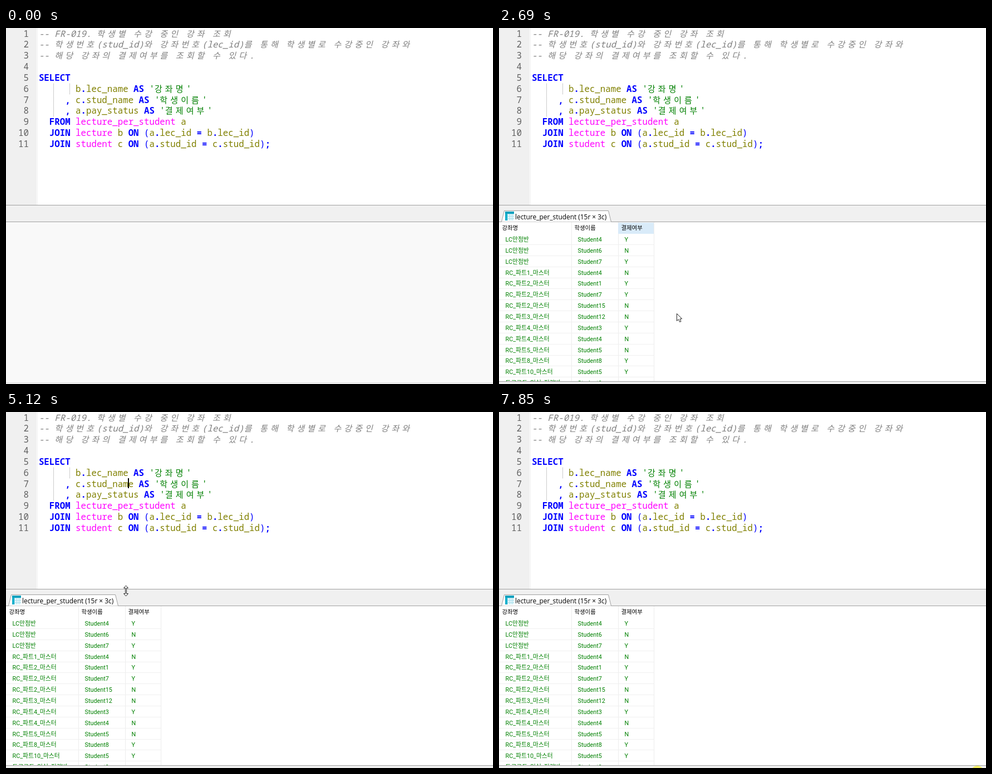
An HTML page with a canvas that plays this animation: 875 px wide and 640 px high, repeating every 7920 ms.

```html
<!DOCTYPE html>
<html lang="ko">
<head>
<meta charset="utf-8">
<style>
  html, body { margin: 0; width: 100%; height: 100%; overflow: hidden; background: #fff; }
  canvas { display: block; }
</style>
</head>
<body>
<canvas id="stage" width="875" height="640"></canvas>
<script>
const ctx = document.getElementById('stage').getContext('2d');
const LOOP = 7920, LINE = 19.85, CELL = 9.455, CODE_X = 58.9, RESULT_AT = 2020;
const MONO = '15.76px "Noto Sans Mono", "DejaVu Sans Mono", monospace';
const HANGUL = '15px "Noto Sans CJK KR", "Noto Sans CJK", sans-serif';
const GRID_FONT = 'Roboto, "Noto Sans CJK KR", "Noto Sans CJK", sans-serif';

const code = [
  '-- FR-019. 학생별 수강 중인 강좌 조회',
  '-- 학생번호(stud_id)와 강좌번호(lec_id)를 통해 학생별로 수강중인 강좌와',
  '-- 해당 강좌의 결제여부를 조회할 수 있다.',
  '',
  'SELECT',
  "       b.lec_name AS '강좌명'",
  "     , c.stud_name AS '학생이름'",
  "     , a.pay_status AS '결제여부'",
  '  FROM lecture_per_student a',
  '  JOIN lecture b ON (a.lec_id = b.lec_id)',
  '  JOIN student c ON (a.stud_id = c.stud_id);'
];
const TOKEN = /'[^']*'|\w+|[^\w\s]/g;

const part = n => `RC_파트${n}_마스터`;
const rows = [
  ['LC만점반', 4, 'Y'], ['LC만점반', 6, 'N'], ['LC만점반', 7, 'Y'],
  [part(1), 4, 'N'], [part(2), 1, 'Y'], [part(2), 7, 'Y'], [part(2), 15, 'N'],
  [part(3), 12, 'N'], [part(4), 3, 'Y'], [part(4), 4, 'N'], [part(5), 5, 'N'],
  [part(8), 8, 'Y'], [part(10), 5, 'Y'], ['토르코트_입실_전략반', 9, '']
];
const columns = [[0, 130, '강좌명'], [130, 214, '학생이름'], [214, 278, '결제여부']];

// Pointer paths: each is a run of [time, x, y]; the pointer is hidden between runs.
const paths = [
  [[190, 806, 603], [259, 806, 603], [260, 529, 255], [330, 529, 255]],
  [[530, 228, 2], [800, 210, 55], [1150, 221, 123], [1480, 221, 123], [1610, 260, 180],
   [2020, 260, 180], [2290, 245, 358], [2550, 245, 358], [2690, 320, 512],
   [2830, 230, 605], [2980, 80, 610], [3120, 12, 500], [3260, 35, 370], [3380, 140, 326],
   [3510, 270, 380], [3640, 284, 510], [3780, 190, 608], [3930, 50, 590], [4060, 8, 470],
   [4180, 35, 360], [4250, 70, 323.5], [4350, 210, 330], [4480, 340, 410], [4600, 355, 530],
   [4710, 250, 620], [4830, 80, 600], [4920, 15, 480], [5030, 60, 360], [5120, 214, 321.5],
   [5260, 320, 365], [5420, 352, 470], [5660, 352, 579], [6130, 352, 579],
   [6550, 340, 562], [7080, 352, 579], [7290, 783, 597], [7360, 783, 597]]
];
const caretOn = [[1100, 1550], [2700, 3240], [3780, 4320], [4870, 5400], [5930, 6480], [7080, 7630]];
const hovers = [[2200, 2760, 2], [3220, 3320, 0], [3450, 3530, 2], [4120, 4320, 0],
                [4380, 4450, 2], [5000, 5060, 0], [5220, 5300, 2]];
const during = t => ([from, to]) => t >= from && t < to;

function box(color, x, y, w, h) {
  ctx.fillStyle = color;
  ctx.fillRect(x, y, w, h);
}

function text(value, x, y, font, color, align = 'left') {
  ctx.font = font;
  ctx.fillStyle = color;
  ctx.textAlign = align;
  ctx.fillText(value, x, y);
}

function shape(points, fill, stroke, close = true) {
  ctx.beginPath();
  points.forEach(([x, y]) => ctx.lineTo(x, y));
  if (close) ctx.closePath();
  ctx.fillStyle = fill;
  ctx.strokeStyle = stroke;
  ctx.lineWidth = 1;
  ctx.fill();
  ctx.stroke();
}

// Hangul takes two cells of the character grid.
function cells(value, column, y, style, color) {
  for (const ch of value) {
    const wide = /[가-힣]/.test(ch);
    text(ch, CODE_X + column * CELL, y, style + (wide ? HANGUL : MONO), color);
    column += wide ? 2 : 1;
  }
}

function tokenStyle(token) {
  if (/^(SELECT|AS|FROM|JOIN|ON)$/.test(token)) return ['bold ', '#0000ff'];
  if (/^(lecture_per_student|lecture|student)$/.test(token)) return ['', '#ff00ff'];
  if (token[0] === "'") return ['', '#008000'];
  if (/\w/.test(token)) return ['', '#808000'];
  return [/[()]/.test(token) ? '' : 'bold ', '#0000ff'];
}

function drawEditor() {
  box('#fff', 0, 0, 875, 318);
  box('#f0f0f0', 0, 0, 55, 318);
  box('#f0f0f0', 56, 0, 1, 318);
  for (let y = 100; y < 160; y += 2) {
    box('#999', 85, y, 1, 1);
    if (y < 120) box('#999', 114, y, 1, 1);
  }
  code.forEach((line, i) => {
    const y = 15.5 + i * LINE;
    text(i + 1, 41, y, MONO, '#606060', 'right');
    if (line.startsWith('--')) return cells(line, 0, y, 'italic ', '#808080');
    for (const match of line.matchAll(TOKEN)) {
      cells(match[0], match.index, y, ...tokenStyle(match[0]));
    }
  });
}

function drawTab() {
  shape([[4.5, 348.5], [9.5, 328.5], [196.5, 328.5], [201.5, 348.5]], '#fff', '#a0a0a0', false);
  box('#a9dfec', 11, 330, 16, 16);
  box('#069fbd', 11, 330, 16, 4);
  box('#18b0cc', 11, 334, 4, 12);
  for (let i = 0; i < 3; i++) {
    for (let j = 0; j < 3; j++) box('#e4f7fb', 16 + i * 4, 335 + j * 4, 3, 3);
  }
  text('lecture_per_student (15r × 3c)', 29, 344, '11.9px "Open Sans", sans-serif', '#000');
}

function drawResults(t) {
  box('#fff', 0, 349, 875, 286);
  drawTab();
  const hover = hovers.find(during(t));
  columns.forEach(([left, right, title], i) => {
    if (hover && hover[2] === i) box('#d9ebf9', left, 350, right - left, 20);
    box('#ececec', right, 349, 1, 286);
    text(title, left + 5.5, 362.5, '10.4px ' + GRID_FONT, '#000');
  });
  ctx.save();
  ctx.beginPath();
  ctx.rect(0, 349, 875, 286);
  ctx.clip();
  rows.forEach(([lecture, student, paid], i) => {
    const y = 384 + i * LINE;
    [lecture, 'Student' + student, paid].forEach((value, c) =>
      text(value, columns[c][0] + 11.5, y, '10.8px ' + GRID_FONT, '#008000'));
    box('#f0f0f0', 0, Math.round(y + 5), 278, 1);
  });
  ctx.restore();
  box('#f0f0f0', 0, 635, 875, 5);
  box('#a0a0a0', 0, 635, 875, 1);
}

function pointerAt(t) {
  const path = paths.find(p => t >= p[0][0] && t < p[p.length - 1][0]);
  if (!path) return null;
  const next = path.findIndex(p => p[0] > t);
  const [t0, x0, y0] = path[next - 1], [t1, x1, y1] = path[next];
  const k = (t - t0) / (t1 - t0);
  return [x0 + (x1 - x0) * k, y0 + (y1 - y0) * k];
}

function drawPointer([x, y]) {
  ctx.save();
  ctx.translate(Math.round(x), Math.round(y));
  if (y < 315) {
    box('#333', 0, -7, 1, 14);
    for (const end of [-8, 7]) {
      box('#333', -3, end, 3, 1);
      box('#333', 1, end, 3, 1);
    }
  } else if (y < 323) {
    shape([[.5, -10], [4.5, -5.5], [1.5, -5.5], [1.5, 4.5], [4.5, 4.5], [.5, 9],
           [-3.5, 4.5], [-.5, 4.5], [-.5, -5.5], [-3.5, -5.5]], '#fff', '#222');
  } else {
    shape([[.5, .5], [.5, 13.5], [3.5, 10.8], [5.7, 15.5], [8, 14.5], [6, 10], [9.8, 9.8]],
      '#fff', '#222');
  }
  ctx.restore();
}

function draw(t) {
  drawEditor();
  box('#f0f0f0', 0, 318, 875, 31);
  box('#a0a0a0', 0, 318, 875, 1);
  box('#a0a0a0', 0, 348, 875, 1);
  if (t >= RESULT_AT) {
    drawResults(t);
  } else {
    box('#f9f9f9', 0, 349, 875, 288);
    box('#e7e7e7', 0, 637, 875, 2);
    box('#f9f9f9', 0, 639, 875, 1);
  }
  if (caretOn.some(during(t))) box('#000', 219, 119, 2, 18);
  const pointer = pointerAt(t);
  if (pointer) drawPointer(pointer);
  if (t >= 7850) {
    ctx.beginPath();
    ctx.arc(859.5, 648, 12, 0, Math.PI * 2);
    ctx.fillStyle = '#f3ee62';
    ctx.fill();
  }
}

const start = performance.now();
function tick() {
  draw((performance.now() - start) % LOOP);
  requestAnimationFrame(tick);
}
tick();
</script>
</body>
</html>
```
